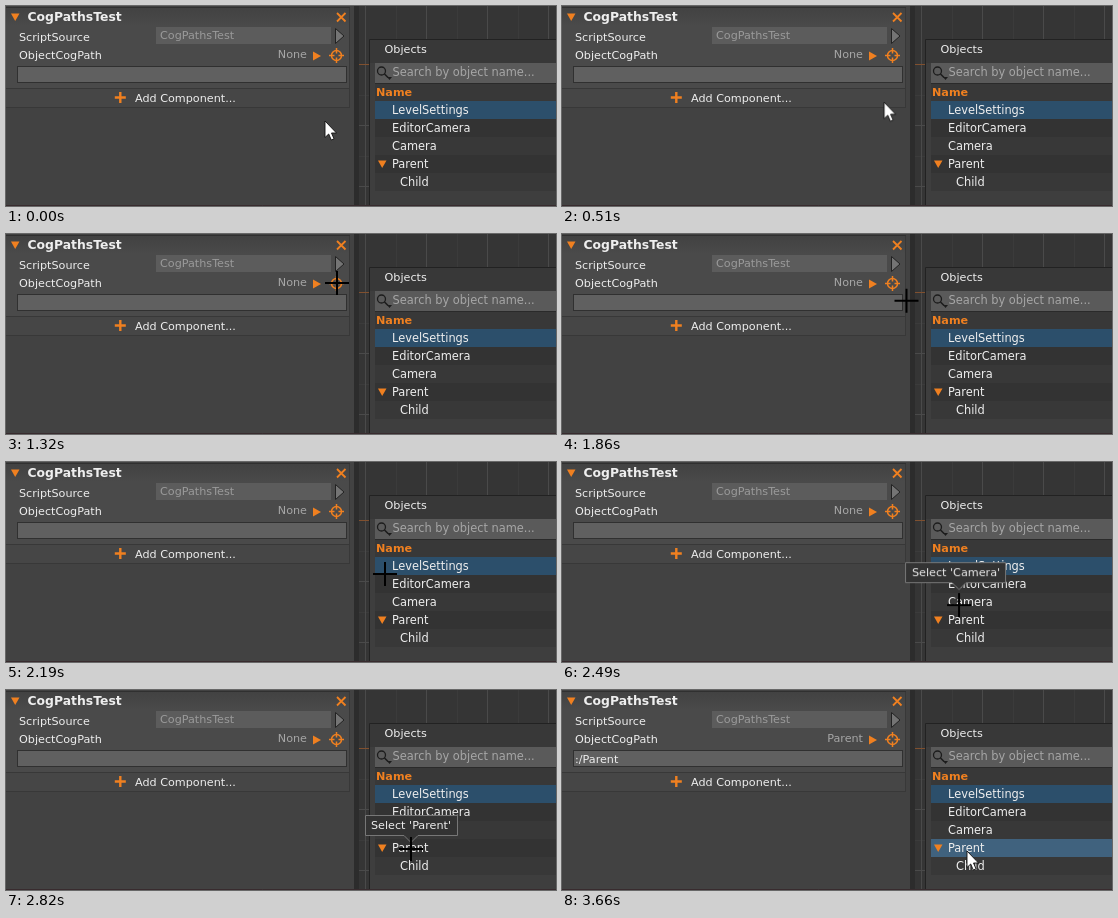
An HTML page for the animation above (4200 ms loop, 550 px wide and 200 px high).

```html
<!DOCTYPE html>
<html lang="en">
<head>
<meta charset="utf-8">
<title>Picking an object path</title>
<style>
  html, body { margin: 0; width: 100%; height: 100%; overflow: hidden; background: #424242; }
  svg { display: block; width: 550px; height: 200px; }
  text { font: 11.2px "DejaVu Sans", Verdana, sans-serif; fill: #eee; white-space: pre; }
  .bold { font-weight: bold; }
  .title { font-size: 12.4px; }
  .wide { font-size: 11.4px; }
  .dim { fill: #a6a6a6; }
  .faint { fill: #9a9a9a; }
  .end { text-anchor: end; }
  .mid { text-anchor: middle; }
  .orange { fill: #f08020; }
  .line { fill: none; stroke: #f08020; }

  .arrow, .cross, .tip, .on, .off { animation: 4200ms linear infinite; }
  .on, .off { animation-timing-function: step-end; }

  .arrow { animation-name: arrow; }
  @keyframes arrow {
    0%, 8.929% { transform: translate(319px, 115px); animation-timing-function: cubic-bezier(.35, .2, .55, .95); }
    20.714% { transform: translate(330px, 48px); animation-timing-function: step-end; }
    31.429%, 100% { transform: translate(405px, 161px); }
  }
  .cross { animation-name: cross; }
  @keyframes cross {
    0%, 40.357% { transform: translate(331px, 49px); animation-timing-function: cubic-bezier(.4, .17, .6, .83); }
    52.143%, 52.857% { transform: translate(379px, 112px); }
    59.286% { transform: translate(397px, 143px); animation-timing-function: cubic-bezier(.3, .55, .6, 1); }
    65.714%, 100% { transform: translate(405px, 159px); }
  }
  /* the hint trails the pointer slightly */
  .tip { animation-name: tip; }
  @keyframes tip {
    0%, 53.571% { transform: translate(379px, 112px); }
    59.286% { transform: translate(394px, 134px); animation-timing-function: cubic-bezier(.3, .55, .6, 1); }
    67.143%, 100% { transform: translate(405px, 159px); }
  }

  .idle { animation-name: idle; }
  @keyframes idle { 0% { opacity: 1; } 31.429% { opacity: 0; } 86.429%, 100% { opacity: 1; } }
  .picking { animation-name: picking; }
  @keyframes picking { 0% { opacity: 0; } 31.429% { opacity: 1; } 86.429%, 100% { opacity: 0; } }
  .empty { animation-name: empty; }
  @keyframes empty { 0% { opacity: 1; } 86.429%, 100% { opacity: 0; } }
  .filled { animation-name: filled; }
  @keyframes filled { 0% { opacity: 0; } 86.429%, 100% { opacity: 1; } }
  .hover { animation-name: hover; }
  @keyframes hover { 0% { opacity: 0; } 87.143%, 100% { opacity: 1; } }
  .editor { animation-name: editor; }
  @keyframes editor { 0% { opacity: 0; } 54.286% { opacity: 1; } 57.143%, 100% { opacity: 0; } }
  .camera { animation-name: camera; }
  @keyframes camera { 0% { opacity: 0; } 57.143% { opacity: 1; } 61.429%, 100% { opacity: 0; } }
  .parent { animation-name: parent; }
  @keyframes parent { 0% { opacity: 0; } 61.429% { opacity: 1; } 86.429%, 100% { opacity: 0; } }
</style>
</head>
<body>
<svg viewBox="0 0 550 200">
  <defs>
    <linearGradient id="bar" x2="0" y2="1">
      <stop stop-color="#424242"/><stop offset="1" stop-color="#4a4a4a"/>
    </linearGradient>
  </defs>

  <!-- property panel -->
  <rect width="348" height="200" fill="#424242"/>
  <rect y="2" width="344" height="80" fill="#4a4a4a"/>
  <rect y="2" width="344" height="18" fill="url(#bar)"/>
  <path d="M0 1.5H344" stroke="#303030"/>
  <rect y="83" width="344" height="18" fill="#464646"/>
  <path d="M0 82.5H344M0 101.5H344M343.5 2V101" fill="none" stroke="#383838"/>

  <path class="orange" d="M5 7.500H13.500L9.200 15Z"/>
  <text class="bold title" x="21.5" y="15">CogPathsTest</text>
  <path class="line" stroke-width="1.800" d="M331 7L339.500 15.500M339.500 7L331 15.500"/>

  <text x="13" y="35">ScriptSource</text>
  <rect x="150" y="21" width="175" height="17" fill="#5c5c5c"/>
  <text class="faint" x="154" y="33">CogPathsTest</text>
  <path d="M329.5 22.5V37.5L338 30Z" fill="#747474" stroke="#222"/>

  <text x="13" y="53">ObjectCogPath</text>
  <text class="dim end off empty" x="301" y="52">None</text>
  <text class="dim end on filled" x="301" y="52">Parent</text>
  <path class="orange" d="M307 45.500V54.500L315 50Z"/>
  <circle class="line" cx="330.500" cy="49.500" r="5" stroke-width="1.500"/>
  <path class="line" stroke-width="1.500" d="M330.500 42V47.500M330.500 51.500V57M323 49.500H328.500M332.500 49.500H338"/>

  <rect x="11.500" y="60.500" width="329" height="16" fill="#606060" stroke="#303030"/>
  <text class="on filled" x="13" y="73">:/Parent</text>

  <path class="line" stroke-width="2.400" d="M114.300 86V97M108.800 91.500H119.800"/>
  <text x="129" y="96">Add Component...</text>

  <!-- viewport behind the object list -->
  <rect x="348" width="5" height="200" fill="#2c2c2c"/>
  <rect x="353" width="197" height="200" fill="#353535"/>
  <path d="M390.500 0V34M451.500 0V34M512.500 0V34M353 89.500H364M353 150.500H364" fill="none" stroke="#3b3b3b"/>
  <path d="M359.500 0V200M420.500 0V34M481.500 0V34M542.500 0V34M353 119.500H364M353 180.500H364" fill="none" stroke="#4a4a4a"/>
  <path d="M353 58.500H364" stroke="#80502f"/>

  <!-- object list -->
  <rect x="364" y="34" width="186" height="166" fill="#3e3e3e"/>
  <rect x="364" y="34" width="186" height="23" fill="#383838"/>
  <path d="M363.500 200V33.500H550" fill="none" stroke="#222"/>
  <text x="378.500" y="47">Objects</text>
  <rect x="369" y="57" width="181" height="20" fill="#5a5a5a"/>
  <path d="M369 77.500H550" stroke="#2a2a2a"/>
  <circle cx="375.500" cy="65" r="4" fill="none" stroke="#1c1c1c" stroke-width="1.300"/>
  <path d="M378.500 68L382 71.500" stroke="#1c1c1c" stroke-width="1.600"/>
  <path d="M381 71H386L383.500 74Z" fill="#1c1c1c"/>
  <text class="dim wide" x="386.500" y="70">Search by object name...</text>

  <rect x="369" y="78" width="181" height="17" fill="#383838"/>
  <text class="bold orange" x="370" y="90">Name</text>
  <rect x="369" y="95" width="181" height="18" fill="#2c4f6b"/>
  <rect x="369" y="113" width="181" height="72" fill="#333"/>
  <rect x="369" y="131" width="181" height="18" fill="#383838"/>
  <rect x="369" y="167" width="181" height="18" fill="#383838"/>
  <rect class="on hover" x="369" y="149" width="181" height="18" fill="#40627e"/>
  <path class="orange" d="M372 154.500H380.500L376.200 162Z"/>
  <text class="wide" x="386" y="108">LevelSettings</text>
  <text class="wide" x="386" y="126">EditorCamera</text>
  <text class="wide" x="386" y="144">Camera</text>
  <text class="wide" x="386" y="162">Parent</text>
  <text class="wide" x="394" y="180">Child</text>

  <path d="M0 199.500H550" stroke="#382b2e"/>

  <!-- hints -->
  <g class="tip" fill="#333" stroke="#777">
    <g class="on editor">
      <path d="M-66.500 -33.500H66.500V-13.500H7L0 -6.500L-7 -13.500H-66.500Z"/>
      <text class="mid" y="-20" stroke="none">Select 'EditorCamera'</text>
    </g>
    <g class="on camera">
      <path d="M-50.500 -33.500H49.500V-13.500H10L3 -6.500L-4 -13.500H-50.500Z"/>
      <text class="mid" y="-20" stroke="none">Select 'Camera'</text>
    </g>
    <g class="on parent">
      <path d="M-45.500 -33.500H46.500V-13.500H7L0 -6.500L-7 -13.500H-45.500Z"/>
      <text class="mid" y="-20" stroke="none">Select 'Parent'</text>
    </g>
  </g>

  <!-- pointers -->
  <g class="off idle">
    <path class="arrow" d="M0 0V16.500L3.700 13L6.300 19L9 17.800L6.500 12H11.500Z" fill="#fff" stroke="#111" stroke-width=".9"/>
  </g>
  <g class="on picking">
    <path class="cross" d="M-12 0H12M0 -12V12" fill="none" stroke="#000" stroke-width="2"/>
  </g>
</svg>
</body>
</html>
```
